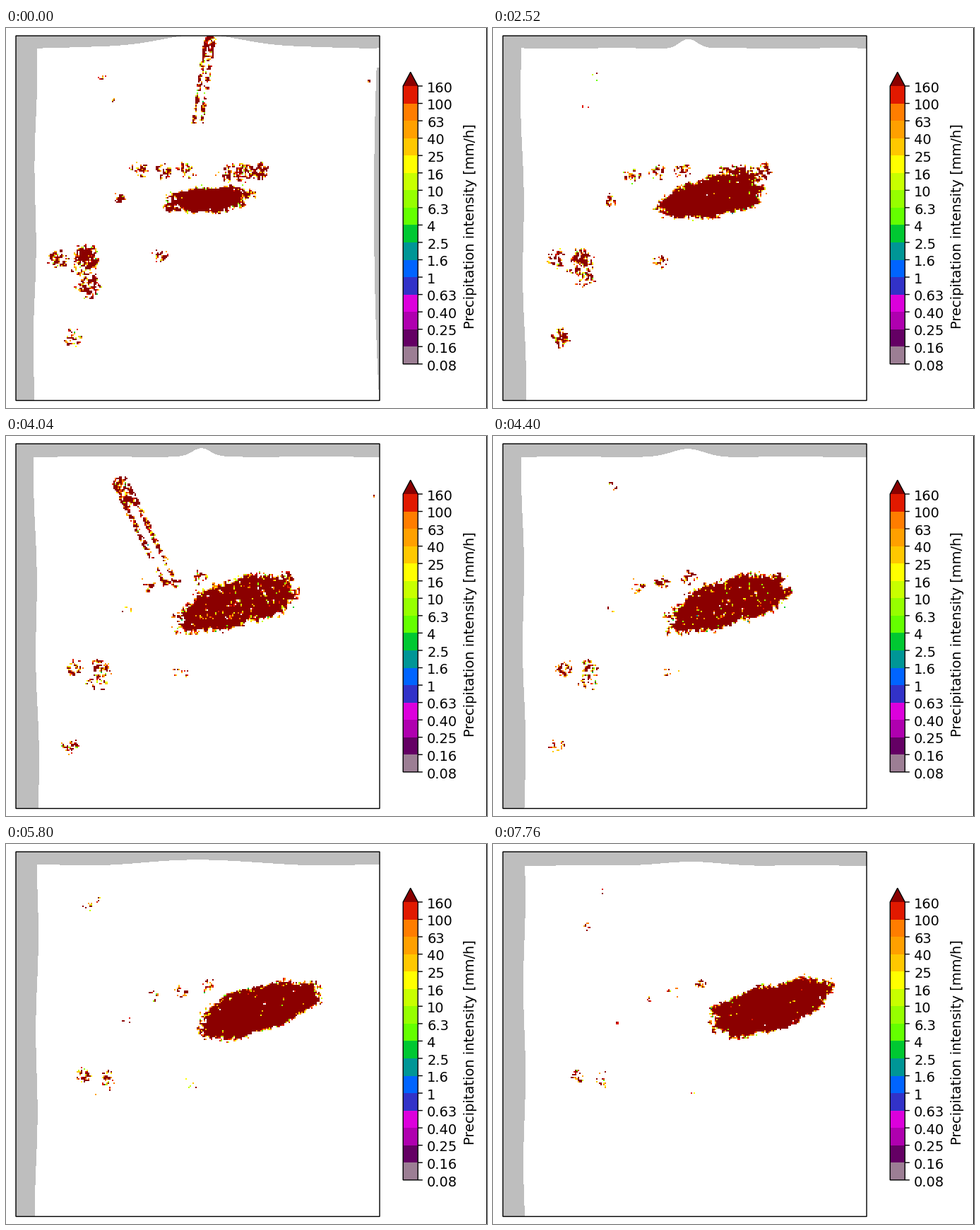
These frames come from a looping animation (681 px wide and 537 px high, 8 s). A matplotlib script:

```python
import numpy as np
import matplotlib.pyplot as plt
from matplotlib.animation import FuncAnimation
from matplotlib.patches import Polygon, Rectangle

W, H, DPI = 681, 537, 64
PT = 72 / DPI                      # points per pixel
STEP, FRAMES = 40, 200
LEFT, TOP, N = 14, 11, 258         # map origin and cells per side (2 px each)

SCALE = ["#9c7e94", "#640064", "#AF00AF", "#DC00DC", "#3232C8", "#0064FF",
         "#009696", "#00C832", "#64FF00", "#96FF00", "#C8FF00", "#FFFF00",
         "#FFC800", "#FFA000", "#FF7D00", "#E11900"]
LEVELS = ["0.08", "0.16", "0.25", "0.40", "0.63", "1", "1.6", "2.5", "4",
          "6.3", "10", "16", "25", "40", "63", "100", "160"]
EXTREME = "#8B0000"

# The weather advances in bursts: time in ms against phase.
CLOCK = [0, 280, 920, 1320, 2000, 2520, 2960, 3520, 3920, 4040, 5040, 6480,
         7280, 7760]
PHASE = [0, .04, .04, 1, 1, 2, 2, 2.8, 2.8, 3, 4, 5, 5.96, 6]


def rgb(code):
    return [int(code[i:i + 2], 16) for i in (1, 3, 5)]


PALETTE = np.array([rgb(c) for c in ["#ffffff", EXTREME] + SCALE], np.uint8)
GREY = 190

rng = np.random.default_rng(11)


def noise():
    """Slightly clumped noise with unit spread."""
    n = rng.normal(size=(N, N))
    n = n + .35 * sum(np.roll(n, s, a) for s in (-1, 1) for a in (0, 1))
    return n / n.std()


NOISE_A, NOISE_B = noise(), noise()
TINT = (8 + 10 * rng.random((N, N)) ** .35).astype(int)
CX = LEFT + 1 + 2 * np.arange(N)
CY = (TOP + 1 + 2 * np.arange(N))[:, None]
PX = LEFT + np.arange(2 * N)
PY = (TOP + np.arange(2 * N))[:, None]


class Echo:
    """Rain field that patches are merged into."""

    def __init__(self, p):
        self.shift = int(round(8 * p))
        n = np.cos(1.1 * p) * NOISE_A + np.sin(1.1 * p) * NOISE_B
        self.noise = np.roll(n, self.shift, 1)
        self.field = np.full((N, N), -9.0)

    def window(self, x0, x1, y0, y1):
        lo = np.clip([(y0 - TOP) / 2, (x0 - LEFT) / 2], 0, N).astype(int)
        hi = np.clip([(y1 - TOP) / 2 + 1, (x1 - LEFT) / 2 + 1], 0, N).astype(int)
        return slice(lo[0], hi[0]), slice(lo[1], hi[1])

    def merge(self, box, fill, r):
        value = fill + .45 * self.noise[box] - 1.2 * r ** 4
        self.field[box] = np.maximum(self.field[box], value)

    def patch(self, x, y, rx, ry, fill):
        if fill < -.9 or min(rx, ry) < 1:
            return
        box = self.window(x - 1.4 * rx, x + 1.4 * rx, y - 1.4 * ry, y + 1.4 * ry)
        self.merge(box, fill, np.hypot((CX[box[1]] - x) / rx, (CY[box[0]] - y) / ry))

    def line(self, a, b, width, fill, fade=0):
        lo, hi = np.minimum(a, b) - 2 * width, np.maximum(a, b) + 2 * width
        box = self.window(lo[0], hi[0], lo[1], hi[1])
        dx, dy = CX[box[1]] - a[0], CY[box[0]] - a[1]
        ux, uy = b - a
        s = np.clip((dx * ux + dy * uy) / (ux * ux + uy * uy), 0, 1)
        self.merge(box, fill - fade * s,
                   np.hypot(dx - s * ux, dy - s * uy) / width)

    def beam(self, a, b, gap):
        """Interference: a dense head and two fading parallel lines."""
        a, b = np.array(a, float), np.array(b, float)
        along = b - a
        side = gap * np.array([-along[1], along[0]]) / np.hypot(*along)
        self.line(a, a + .2 * along, gap + 4, .15)
        for sign in (-1, 1):
            self.line(a + sign * side, b + sign * side, 4.5, .35, .45)


def storm(echo, p):
    """Main storm: a sheared, growing, ragged oval drifting east."""
    x, y = 288 + 9 * p + 1.4 * p * p, 242 - 1.8 * p
    rx, ry = min(57 + 8 * p, 83), min(18 + 5 * p, 33)
    slope = min(.06 + .06 * p, .26)
    u = (CX - x) / rx
    v = (CY - y + slope * (CX - x)) / ry
    angle = np.arctan2(v, u)
    r = (abs(u) ** 2.4 + abs(v) ** 2.4) ** (1 / 2.4)
    r = r + .06 * np.sin(3 * angle + p) + .05 * np.sin(8 * angle - p)
    fill = .95 - .28 * np.exp(-(p - 3) ** 2)
    body = fill * np.clip((1 - r) * ry / 5, -2, 1) + .3 * echo.noise
    echo.field = np.maximum(echo.field, body)
    # frayed rear, northern fringe and leading tip
    echo.patch(x - .9 * rx, y + .9 * slope * rx + 3, 17, 17, .2)
    echo.patch(334 + 9 * p, 204, 44 - 3 * p, 15 - p, .22)
    echo.patch(360 + 12 * p, 200 + 1.5 * p, 14, 14, .35)


def small_cells(echo, p):
    # row of showers north-west of the storm
    for i in range(3):
        echo.patch(187 + 34 * i + (5 + i) * p, 202 + (3 - 1.7 * i) * p,
                   17 - .5 * p, 14 - .6 * p, .12 - (.11 - .03 * i) * p)
    echo.patch(161 + 2.5 * p, 240 + 2 * p, 11, 12, -.1 * p)
    # western showers: two drifting east, one breaking up below them
    echo.patch(74 + 8 * p, 326 + .5 * p, 18 - .8 * p, 18 - p, .1)
    echo.patch(113 + 7 * p, 325 + 1.5 * p, 20 - p, 21 - p, .65 - .17 * p)
    echo.patch(117 + 6 * p, 363 - 4 * p, 20 - p, 21 - 2 * p, .3 - .22 * p)
    echo.patch(102 + 6 * p, 346, 13, 11, .1 - .2 * p)
    # southern shower, strongest early on
    echo.patch(95 + 4 * np.sin(1.5 * p), 438, 17, 16, .25 - .14 * (p - 1.5) ** 2)
    echo.patch(218 + 10 * p, 322 + 4 * p, 14, 12, .05 - .14 * p)
    # stray specks
    spots = np.random.default_rng(20 + int(round(p)))
    for x, y in zip(spots.uniform(115, 195, 2), spots.uniform(60, 140, 2)):
        echo.patch(x, y, 9, 9, -.4)
    echo.patch(514 + 2 * p, 76 + 3 * p, 5, 3, -.1 - .1 * p)


def outside(p):
    """Pixels beyond the radar coverage."""
    swing = np.cos(np.pi * p / 2.5)
    left = (41.5 + .5 * p + (1 - 2.8 * swing) * (PY - 260) / 260
            + 1.5 * np.sin(PY / 40 + p))
    base, peak = 28 + .4 * p, 10 + 2.6 * p
    bump = np.exp(-((PX - 276) / (50 + 40 * swing)) ** 2)
    top = base - (base - peak) * bump + .6 * np.sin(PX / 25 + 2 * p)
    right = 521 + 7 * p + 6 * ((PY - 250) / 250) ** 2
    right = np.where(PY > 55, right, W)
    return (PX < np.round(left)) | (PY < np.round(top)) | (PX >= np.round(right))


def radar(t):
    p = float(np.interp(t, CLOCK, PHASE))
    echo = Echo(p)
    storm(echo, p)
    small_cells(echo, p)
    if t < 960:
        echo.beam((289, 16), (271, 135), 5)
    elif 3960 <= t < 4200:
        echo.beam((161, 64), (232, 207), 8)
    elif 4920 <= t < 5200:
        echo.beam((290, 28), (284, 155), 5)
    field = echo.field
    tint = np.roll(TINT, echo.shift, 1)
    index = np.where(field > .22, 1, np.where(field > 0, tint, 0))
    image = PALETTE[index].repeat(2, 0).repeat(2, 1)
    image[outside(p)] = GREY
    return image


fig = plt.figure(figsize=(W / DPI, H / DPI), dpi=DPI, facecolor="white")
ax = fig.add_axes([0, 0, 1, 1])
ax.axis("off")
picture = ax.imshow(radar(0), extent=(LEFT, LEFT + 2 * N, TOP + 2 * N, TOP),
                    interpolation="nearest", aspect="auto")
ax.set_xlim(0, W)
ax.set_ylim(H, 0)


def block(x, y, w, h, color):
    ax.add_patch(Rectangle((x, y), w, h, fc=color, ec="none", zorder=2,
                           antialiased=False))


def outline(points, closed=True):
    ax.add_patch(Polygon(points, closed=closed, fc="none", ec="black",
                         lw=1.4 * PT, snap=False, zorder=3))


# map frame and the line at the right of the stage
block(529, 0, 6, H, "white")
block(0, 527, 540, 6, "white")
outline([(14, 11), (529, 11), (529, 526.4), (14, 526.4)])
block(W - 1, 0, 1, H, "black")

# colour scale
X0, X1, Y0, Y1 = 562.2, 583.2, 82, 474.8
tip = ((X0 + X1) / 2, 62.3)
size = (Y1 - Y0) / len(SCALE)
ax.add_patch(Polygon([(X0, Y0), tip, (X1, Y0)], fc=EXTREME, ec="none"))
for i, color in enumerate(SCALE):
    block(X0, Y1 - (i + 1) * size, X1 - X0, size, color)
outline([(X0, Y1), (X0, Y0), tip, (X1, Y0), (X1, Y1)])

font = dict(family="DejaVu Sans", fontsize=19.4 * PT, color="black")
for i, label in enumerate(LEVELS):
    y = Y1 - i * size
    outline([(X1, y), (X1 + 6.6, y)], closed=False)
    ax.text(596.2, y + 8.8, label, va="baseline", ha="left", **font)
ax.text(657.5, 280.5, "Precipitation intensity [mm/h]", rotation=90,
        va="center", ha="center", **font)


def update(frame):
    picture.set_data(radar(frame * STEP))
    return [picture]


anim = FuncAnimation(fig, update, frames=FRAMES, interval=STEP, repeat=True,
                     repeat_delay=0, blit=False)
plt.show()
```
